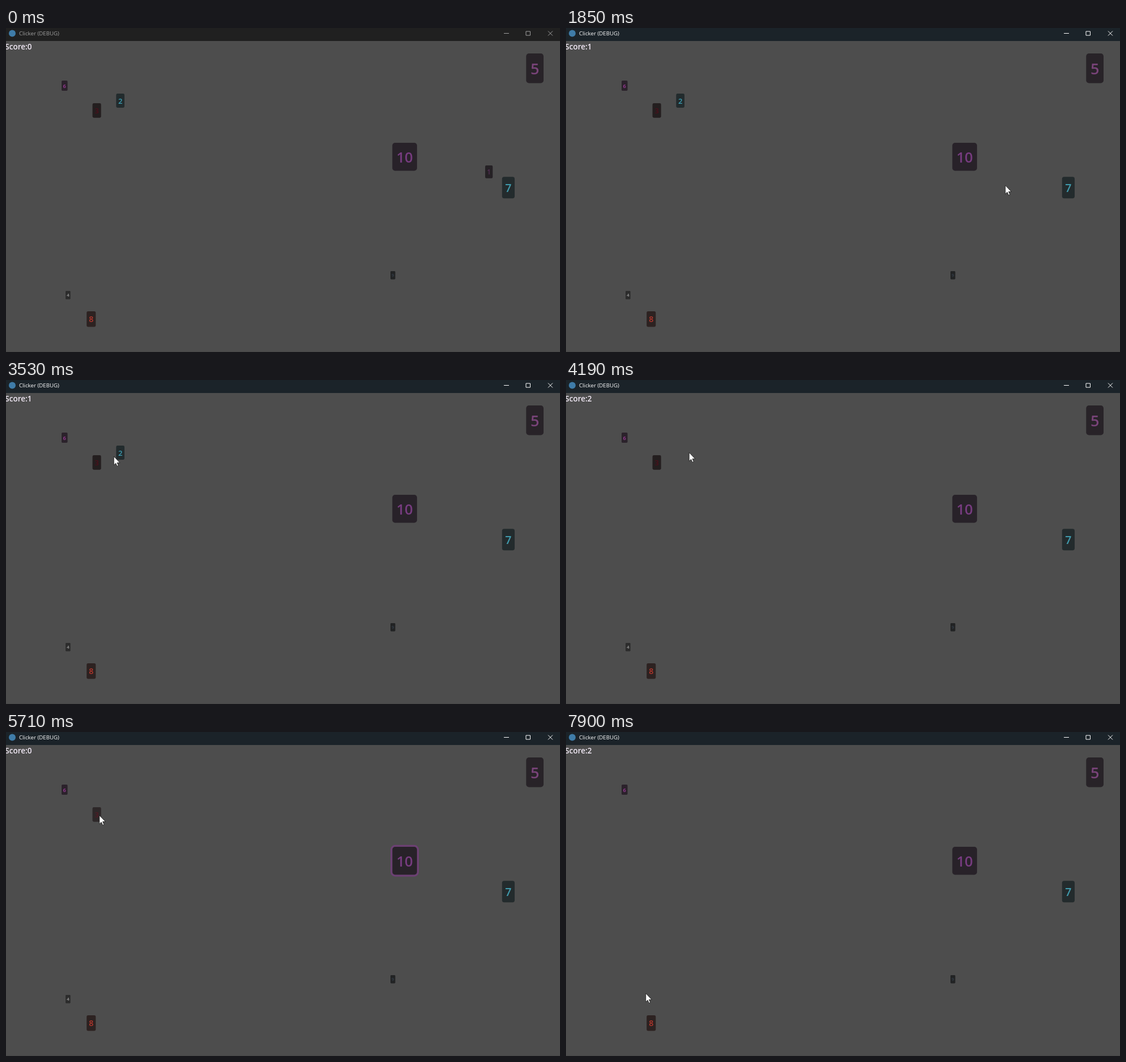
An HTML page that plays this animation: 977 px wide and 573 px high, repeating every 8000 ms.

```html
<!DOCTYPE html>
<html lang="en">
<head>
<meta charset="utf-8">
<title>Clicker</title>
<style>
  html, body { margin: 0; width: 100%; height: 100%; overflow: hidden; background: #4d4d4d; }
  svg { display: block; width: 977px; height: 573px; }
  text { font-family: "Open Sans", "Noto Sans", sans-serif; }
  .label { font-weight: 600; text-anchor: middle; }
  .soft { filter: blur(.5px); }
</style>
</head>
<body>
<svg viewBox="0 0 977 573">
  <rect width="977" height="573" fill="#4d4d4d"/>
  <rect y="572" width="977" height="1" fill="#474747"/>
  <rect id="bar" width="977" height="23"/>
  <circle cx="11" cy="9.5" r="6" fill="#3f7ca8"/>
  <g id="chrome">
    <text x="23" y="13.3" font-size="9.7" fill="currentColor">Clicker (DEBUG)</text>
    <path d="M878 9.5H887M917 6H924.5V13H917ZM956 5.5L964 13.5M964 5.5L956 13.5" fill="none" stroke="currentColor"/>
  </g>
  <text id="score" x="45.6" y="38.4" font-size="13.6" font-weight="600" text-anchor="end" fill="#f0e8f4"></text>
  <g id="buttons"></g>
  <path id="cursor" d="M.2 .2V15.4L3.6 12.2L5.9 17.4L8.3 16.4L6 11.3H10.8Z" fill="#fff" stroke="#111" stroke-width=".8"/>
</svg>
<script>
const LOOP = 8000;
const HOLD = 80; // time from press to release
const $ = id => document.getElementById(id);

// label: left, top, height, colour
const BUTTONS = {
  1: [845, 243, 22.7, "#562f57"],
  2: [194.3, 116, 25, "#3b9fb5"],
  3: [152.6, 133, 25.7, "#4d0f1b"],
  4: [105, 465, 14.7, "#a2a2a2"],
  5: [917.3, 45, 52.5, "#784378"],
  6: [98, 93, 18, "#a03c9c"],
  7: [874.8, 263.3, 38, "#409bad"],
  8: [142.2, 501, 27.4, "#b4372c"],
  9: [678, 430, 14.5, "#37414d"],
  10: [681.3, 203, 49.5, "#773c80"],
};

const CLICKS = [[1660, 1], [3920, 2], [4980, 10], [6000, 3], [7770, 4]];

// key points of the pointer tip: time, x, y
const PATH = [
  [60, 644, 568], [850, 806, 308], [910, 802, 294], [1000, 788, 286],
  [1420, 852, 252], [1660, 852, 252], [2460, 237, 434], [2640, 201, 432],
  [2950, 169, 290], [3280, 181, 138], [3530, 190, 135], [3600, 190, 135],
  [3820, 200, 125], [4120, 200, 125], [4770, 716, 218], [5080, 720, 218],
  [5730, 163, 147], [6080, 161, 146], [6780, 169.5, 412.5],
  [7620, 107, 469], [7780, 107, 469], [7900, 140.5, 462],
];

function make(tag, attrs, parent) {
  const el = document.createElementNS("http://www.w3.org/2000/svg", tag);
  for (const key in attrs) el.setAttribute(key, attrs[key]);
  return parent.appendChild(el);
}

// Every button is one 31 px tall control, scaled by k and tinted.
const buttons = Object.entries(BUTTONS).map(([label, [x, y, h, ink]]) => {
  const k = h / 31, w = h * (.29 + .295 * label.length);
  const g = make("g", { class: k > 1.1 ? "soft" : "" }, $("buttons"));
  const layer = (fill, opacity) => make("rect",
    { x, y, width: w, height: h, rx: 3 * k, fill, "fill-opacity": opacity }, g);
  layer("#000", .58);
  layer(ink, .09);
  make("text", {
    class: "label", x: x + w / 2, y: y + h * .703, "font-size": 16 * k, fill: ink,
  }, g).textContent = label;
  const hover = layer("#fff", .045);
  const focus = make("rect", {
    x: x - k, y: y - k, width: w + 2 * k, height: h + 2 * k, rx: 4 * k,
    fill: "none", stroke: ink, "stroke-width": 2 * k, "stroke-opacity": .75,
  }, g);
  const contains = (px, py) => px >= x && px <= x + w && py >= y && py <= y + h;
  return { number: +label, g, hover, focus, contains };
});

// The right number vanishes and scores; a wrong one resets and keeps focus.
function play(t) {
  const state = { active: false, score: 0, focus: 0, cleared: 0 };
  for (const [press, number] of CLICKS) {
    if (t < press) break;
    state.active = true;
    state.focus = number;
    if (t < press + HOLD) break;
    if (number === state.cleared + 1) {
      state.score++;
      state.cleared = number;
      state.focus = 0;
    } else {
      state.score = 0;
    }
  }
  return state;
}

// Monotone slope: zero at turning points and pauses
function slope(i, axis) {
  const a = PATH[i - 1], b = PATH[i], c = PATH[i + 1];
  if (!a || !c) return 0;
  const before = (b[axis] - a[axis]) / (b[0] - a[0]);
  const after = (c[axis] - b[axis]) / (c[0] - b[0]);
  return before * after > 0 ? 2 * before * after / (before + after) : 0;
}

function pointer(t) {
  const next = PATH.findIndex(p => p[0] > t);
  if (next < 0) return PATH[PATH.length - 1].slice(1);
  const i = next - 1, a = PATH[i], b = PATH[next];
  const d = b[0] - a[0], u = (t - a[0]) / d, v = 1 - u;
  return [1, 2].map(n =>
    a[n] * (1 + 2 * u) * v * v + b[n] * u * u * (3 - 2 * u) +
    d * u * v * (slope(i, n) * v - slope(next, n) * u));
}

const show = (el, on) => el.setAttribute("visibility", on ? "inherit" : "hidden");

function draw(t) {
  const { active, score, focus, cleared } = play(t);
  $("bar").setAttribute("fill", active ? "#1b2329" : "#202020");
  $("chrome").setAttribute("color", active ? "#fff" : "#a0a0a0");
  $("score").textContent = "Score:" + score;

  const visible = t >= PATH[0][0];
  const [x, y] = visible ? pointer(t) : [-99, -99];
  show($("cursor"), visible);
  $("cursor").setAttribute("transform", `translate(${x} ${y})`);

  for (const b of buttons) {
    show(b.g, b.number > cleared);
    show(b.hover, active && b.contains(x, y));
    show(b.focus, b.number === focus);
  }
}

const start = performance.now();
function tick(now) {
  draw(Math.max(0, now - start) % LOOP);
  requestAnimationFrame(tick);
}
draw(0);
requestAnimationFrame(tick);
</script>
</body>
</html>
```
